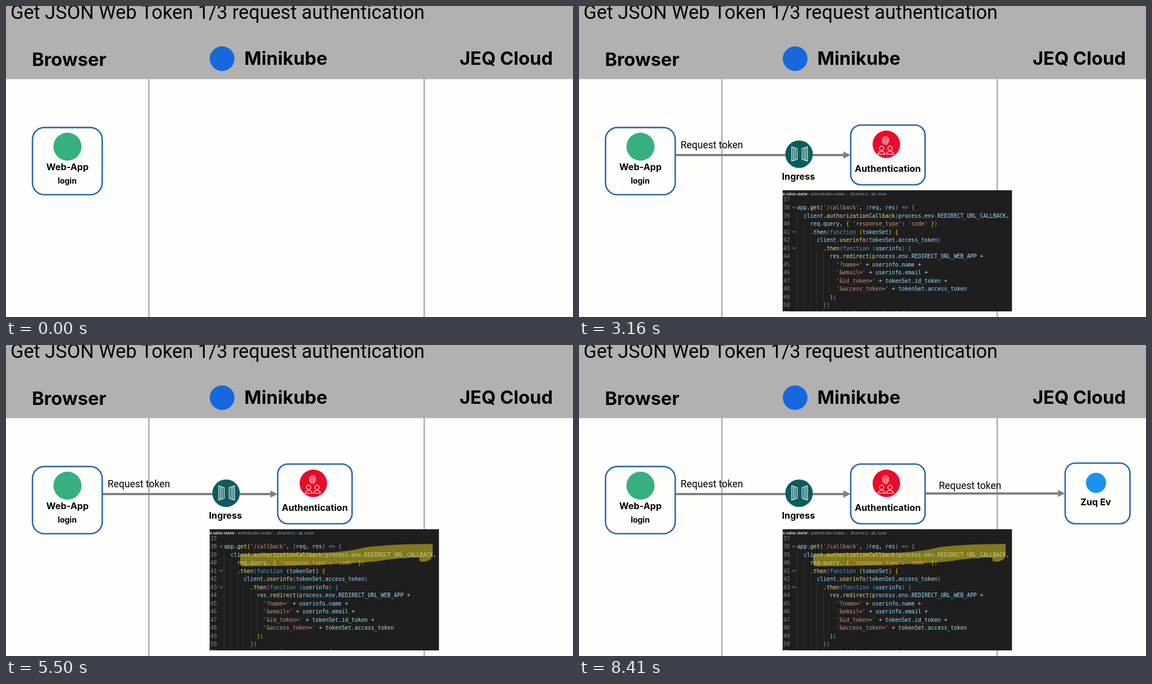
An HTML page that plays this animation: 1010 px wide and 555 px high, repeating every 8.5 s.

```html
<!DOCTYPE html>
<html lang="en">
<meta charset="utf-8">
<title>Request authentication</title>
<style>
  html, body { margin: 0; height: 100%; overflow: hidden; background: #fefefd; }
  svg { display: block; }
  text { font-family: Inter, sans-serif; font-optical-sizing: none; white-space: pre; }
  .bold { font-weight: 700; font-size: 16.2px; text-anchor: middle; }
  .head { font-size: 32.7px; }
  .light { font-family: Roboto, sans-serif; font-size: 17.5px; }
  .mono { font-family: "DejaVu Sans Mono", monospace; font-size: 9.67px; fill: #d4d4d4; }
  .crumb { font-size: 5.8px; fill: #a0a0a0; }
  .box { fill: #fefefd; stroke: #2c66a8; stroke-width: 2.6; }
  .arrow { fill: none; stroke: #808080; stroke-width: 4; }
  .tip { fill: #808080; }
  .icon { fill: none; stroke: #fff; stroke-width: 1.2; }
</style>
<svg width="1010" height="555" viewBox="0 0 1010 555">
  <defs>
    <clipPath id="titleClip"><path d="M0 0H744V60H0Z"/></clipPath>
    <clipPath id="panelClip"><path d="M362.5 328.5H771.5V545H362.5Z"/></clipPath>
    <path id="door" d="M379 251V277M382 252V276M385 253V275M388.5 254V274M378.5 251L389 254.5M378.5 277L389 273.5"/>
    <g id="person"><circle cx="539" cy="254" r="3.8"/><path d="M533 264.5Q533 259.5 539 259.5T545 264.5Z"/></g>
  </defs>

  <path fill="#b1b1b1" d="M0 0H1010V130.5H0Z"/>
  <path stroke="#b0b0b0" stroke-width="2.6" d="M254.5 130V555M745 130V555"/>
  <g clip-path="url(#titleClip)">
    <text class="light" x="8" y="23" style="font-size:34.35px">Get JSON Web Token 1/3 request authentication</text>
  </g>
  <text class="bold head" x="112.5" y="107">Browser</text>
  <circle cx="385" cy="94" r="22" fill="#1767dd"/>
  <text class="bold head" x="498.5" y="105">Minikube</text>
  <text class="bold head" x="891" y="105">JEQ Cloud</text>

  <rect class="box" x="47.2" y="216.9" width="124.2" height="119.8" rx="21"/>
  <circle cx="109.5" cy="251" r="25" fill="#35b07e"/>
  <text class="bold" x="109.5" y="293">Web-App</text>
  <text class="bold" x="109" y="317" style="font-size:14px">login</text>

  <g data-at="1080">
    <path class="arrow" d="M172 266H473"/>
    <path class="tip" d="M471 259.5L483.7 266L471 272.5Z"/>
    <text class="light" x="181" y="253.5">Request token</text>
    <circle cx="392" cy="264.5" r="24.5" fill="#0c5c5d"/>
    <g class="icon"><use href="#door"/><use href="#door" transform="matrix(-1 0 0 1 786 0)"/></g>
    <text class="bold" x="391" y="309.5">Ingress</text>
  </g>

  <g data-at="3160">
    <rect class="box" x="484" y="212.5" width="132.5" height="106.5" rx="18"/>
    <circle cx="547.5" cy="246.8" r="24.5" fill="#ea0a2a"/>
    <g class="icon">
      <use href="#person"/><use href="#person" x="15"/>
      <path stroke-width=".9" d="M541 245V238A5.2 5.2 0 0 1 551.4 238V244M543 247V238.5A3.2 3.2 0 0 1 549.4 238.5V247M545 248V239A1.2 1.2 0 0 1 547.4 239V248"/>
    </g>
    <text class="bold" x="550" y="295.5">Authentication</text>
    <g id="panel" clip-path="url(#panelClip)">
      <path fill="#1e1e1e" d="M362.5 328.5H771.5V545H362.5Z"/>
      <text class="crumb" y="337.7"><tspan x="362.5" fill="#eee" font-weight="600">d-native-starter</tspan><tspan x="408">›</tspan><tspan x="413">authentication-nodejs</tspan><tspan x="476">›</tspan><tspan x="483" fill="#e0d050">JS</tspan><tspan x="491">server.js</tspan><tspan x="516">›</tspan><tspan x="521" fill="#75beff">[ø]</tspan><tspan x="532">issuer</tspan></text>
    </g>
  </g>

  <path data-at="5500" fill="#e6d21c" opacity=".5" d="M417 374Q470 370 560 371Q612 369 640 361Q690 355 760 355V374L757 382L748 386.5H737L736 379Q700 379 660 386Q590 392 500 394L422 395Q417 394 417 389Z"/>

  <g data-at="7580">
    <path class="arrow" d="M618 265H855"/>
    <path class="tip" d="M853 258.5L865.7 264.8L853 271.3Z"/>
    <text class="light" x="641" y="256.5">Request token</text>
    <rect class="box" x="866" y="210.8" width="115.5" height="108.2" rx="18"/>
    <circle cx="921" cy="246" r="18" fill="#1a93f0"/>
    <text class="bold" x="920.5" y="285.8">Zuq Ev</text>
  </g>
</svg>
<script>
const LOOP = 8500, FIRST_LINE = 37, LINE_HEIGHT = 14.5, CHAR = 5.82, CODE_X = 388.5;
const code = `
app.get('/callback', (req, res) => {
  client.authorizationCallback(process.env.REDIRECT_URL_CALLBACK,
    req.query, { 'response_type': 'code' })
    .then(function (tokenSet) {
      client.userinfo(tokenSet.access_token)
        .then(function (userinfo) {
          res.redirect(process.env.REDIRECT_URL_WEB_APP +
            '?name=' + userinfo.name +
            '&email=' + userinfo.email +
            '&id_token=' + tokenSet.id_token +
            '&access_token=' + tokenSet.access_token
          );
        })
          .catch(function (err) {`.split('\n');
const folded = [38, 41, 43];
const brackets = ['#ffd700', '#da70d6', '#3fa9f5'];
const panel = document.getElementById('panel');
let depth = 0;

function add(tag, attrs, content = '') {
  const node = document.createElementNS('http://www.w3.org/2000/svg', tag);
  for (const key in attrs) node.setAttribute(key, attrs[key]);
  node.textContent = content;
  return node;
}

function colorOf(token, rest) {
  if (token[0] === "'") return '#ce9178';
  if (/[({]/.test(token)) return brackets[depth++ % 3];
  if (/[)}]/.test(token)) return brackets[--depth % 3];
  if (token === 'function' || token === '=>') return '#569cd6';
  if (/\w/.test(token)) return rest[0] === '(' ? '#dcdcaa' : '#9cdcfe';
  return '#d4d4d4';
}

code.forEach((line, i) => {
  const number = FIRST_LINE + i, y = 348.5 + i * LINE_HEIGHT;
  panel.append(add('text', { class: 'mono', x: 364, y, style: 'fill:#858585' }, number));
  if (folded.includes(number))
    panel.append(add('path', { d: `M380 ${y - 5}l3 3.2 3-3.2`, fill: 'none', stroke: '#b0b0b0' }));

  const indent = line.search(/\S|$/);
  for (let col = 0; col < indent; col += 2)
    panel.append(add('path', { d: `M${CODE_X + col * CHAR} ${y - 11}v${LINE_HEIGHT}`, stroke: '#3a3a3a', 'stroke-width': .7 }));

  const text = add('text', { class: 'mono', x: CODE_X + indent * CHAR, y });
  for (const match of line.trim().matchAll(/'[^']*'|\w+|=>|\s+|./g)) {
    const rest = line.trim().slice(match.index + match[0].length);
    text.append(add('tspan', { fill: colorOf(match[0], rest) }, match[0]));
  }
  panel.append(text);
});

const steps = document.querySelectorAll('[data-at]');
function draw(now) {
  const time = now % LOOP;
  for (const step of steps)
    step.style.visibility = time >= step.dataset.at ? 'visible' : 'hidden';
  requestAnimationFrame(draw);
}
draw(performance.now());
</script>
</html>
```
